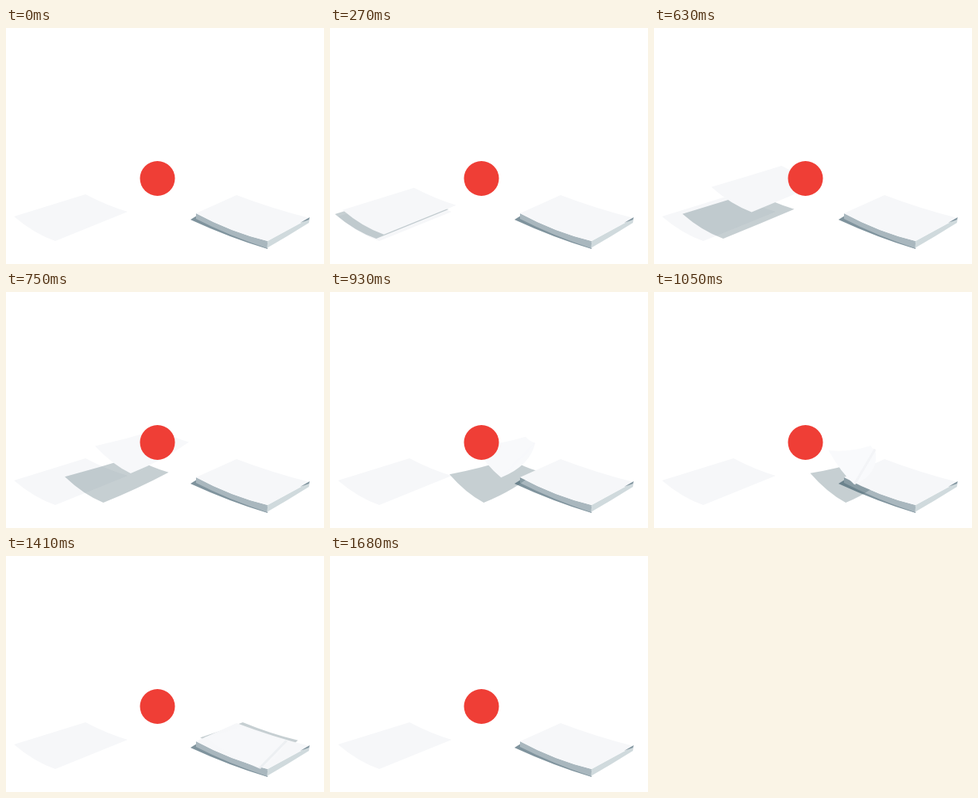
An HTML page with a canvas for the animation above (2220 ms loop, 400 by 298 pixels).

```html
<!DOCTYPE html>
<html>
<head>
<meta charset="utf-8">
<style>
  html, body { margin: 0; width: 100%; height: 100%; overflow: hidden; background: #fff; }
  canvas { display: block; }
</style>
</head>
<body>
<canvas id="stage" width="400" height="298"></canvas>
<script>
const ctx = document.getElementById('stage').getContext('2d');
const LOOP = 2220, STEP = 30, BEGIN = 60, END = 1680;
const TRAVEL = 267;
const PAPER = '#f6f7f9';

// Corners in order: left, top, right, bottom.
const ground = [[10, 238], [100, 210], [153, 232], [62, 269]];
const stack = [[239, 234], [290, 211], [382, 240], [329, 269]];
const curlBy = [[25, -12], [-8, 10], [-62, -9], [0, 0]];

const clamp = v => Math.max(0, Math.min(1, v));
const smooth = v => v * v * (3 - 2 * v);
const hump = (u, from, to) => Math.sin(Math.PI * clamp((u - from) / (to - from))) ** 2;

// Slide across, lift, turn towards the stack's outline and curl the corners.
function corners(dx, lift, turn, curl) {
  return ground.map(([x, y], i) => [
    x + dx + turn * (stack[i][0] - TRAVEL - x) + curl * curlBy[i][0],
    y - lift + turn * (stack[i][1] - y) + curl * curlBy[i][1]
  ]);
}

function sheet([left, top, right, bottom], fill, curl = 0) {
  const edge = (a, b, bendX, bendY) => ctx.quadraticCurveTo(
    (a[0] + b[0]) / 2 + bendX, (a[1] + b[1]) / 2 + bendY, ...b);
  ctx.beginPath();
  ctx.moveTo(...left);
  edge(left, top, 0, 6 * curl);
  edge(top, right, 0, 3);
  edge(right, bottom, 20 * curl, 9 * curl);
  edge(bottom, left, -1, 6);
  ctx.fillStyle = fill;
  ctx.fill();
}

function shape(path, fill) {
  ctx.fillStyle = fill;
  ctx.fill(new Path2D(path));
}

function draw(t) {
  const u = clamp((t - BEGIN) / (END - BEGIN));
  const moving = u > 0 && u < 1;
  const dx = TRAVEL * u * u / (u * u + (1 - u) ** 2);
  const turn = smooth(clamp(u * 2 - 1));
  const curl = hump(u, .3, 1);

  ctx.clearRect(0, 0, 400, 298);
  sheet(ground, PAPER);

  // Sides of the stack
  shape('M232 242L240 237Q280 262 329 271V279Q282 265 232 242Z', '#7f939d');
  shape('M239 234Q283 258 329 269L328 278Q280 262 239 241Z', '#a9b7be');
  shape('M329 269L382 240 381 246Q354 263 328 278Z', '#d0dadd');

  if (moving) {
    const lag = 36 * hump(u, 0, .75);
    sheet(corners(dx - lag, 3, turn, curl / 2), 'rgba(60,90,100,.29)', curl / 2);
  }

  sheet(stack, PAPER);
  shape('M370 246L382 239 381 242Z', '#7f939d');

  if (moving) {
    const points = corners(dx, 40 * hump(u, 0, .87), turn, curl);
    const tone = 246 + Math.round(3 * curl);
    sheet(points, `rgb(${tone},${tone + 1},${tone + 3})`, curl);

    // Shaded fold along the standing edge
    const fold = hump(u, .5, 1);
    ctx.beginPath();
    ctx.moveTo(...points[2]);
    ctx.lineTo(...points[3]);
    ctx.lineWidth = 3;
    ctx.strokeStyle = `rgba(232,236,239,${fold})`;
    ctx.stroke();
  }

  ctx.beginPath();
  ctx.arc(190.5, 190, 22, 0, Math.PI * 2);
  ctx.fillStyle = '#ef3e36';
  ctx.fill();
}

const start = performance.now();
function tick() {
  const t = (performance.now() - start) % LOOP;
  draw(Math.floor(t / STEP) * STEP);
  requestAnimationFrame(tick);
}
tick();
</script>
</body>
</html>
```
